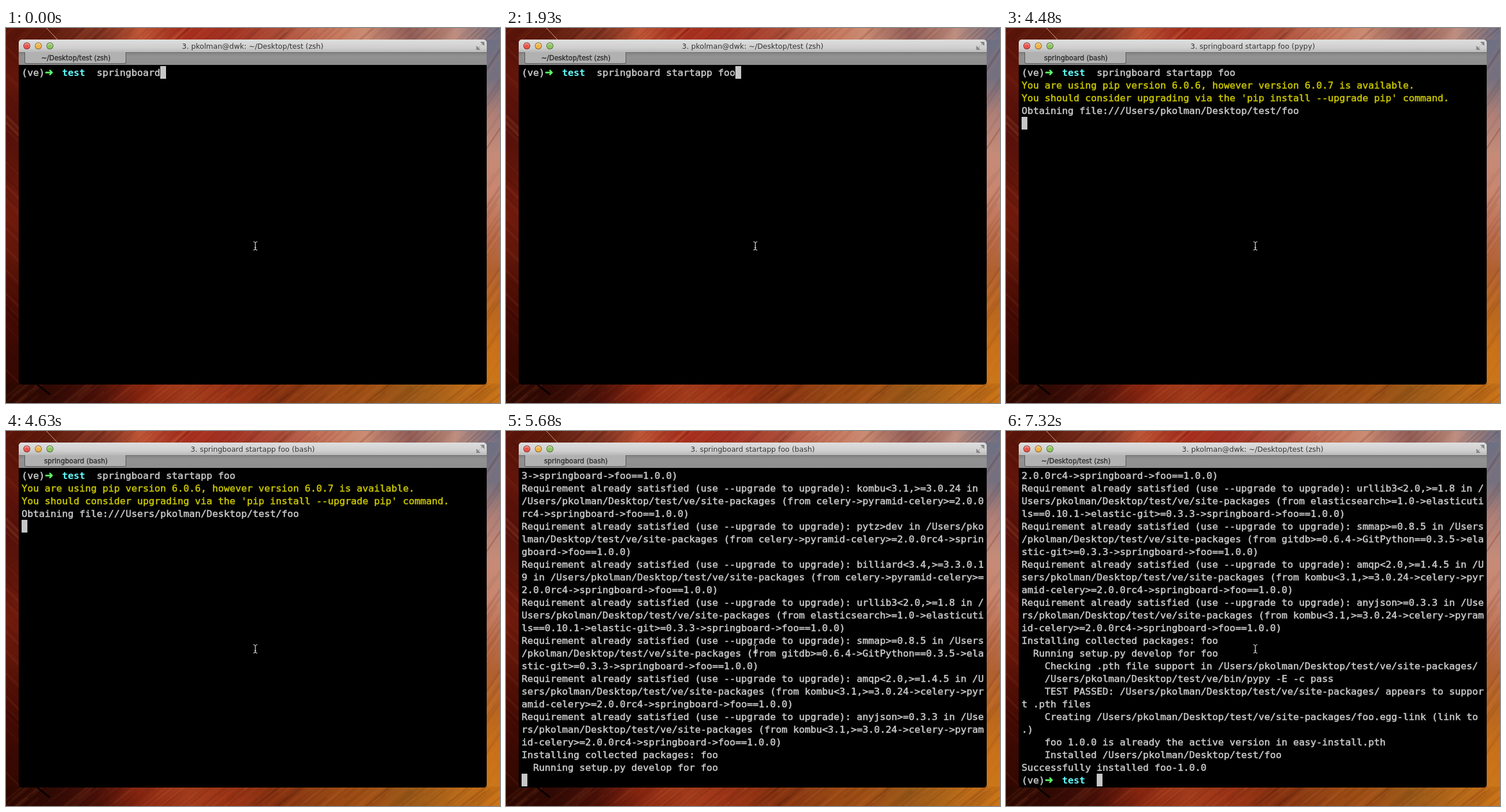
An HTML page with a canvas that plays this animation: 855x650 px, repeating every 8 s.

```html
<!DOCTYPE html>
<html lang="en">
<head>
<meta charset="utf-8">
<title>Terminal session</title>
<style>
  html, body { margin: 0; width: 100%; height: 100%; overflow: hidden; background: #5a1409; }
  #stage { position: relative; width: 855px; height: 650px; overflow: hidden; }
  #stage > * { position: absolute; }
  #wall { left: 0; top: 0; }
  #window { left: 22px; top: 20px; width: 810px; height: 598px; border-radius: 5px; background: #000; overflow: hidden; }
  #window > * { position: absolute; box-sizing: border-box; white-space: pre; text-align: center; }
  #title {
    left: 0; top: 0; width: 810px; height: 22px;
    font: 12.5px/23px "DejaVu Sans", sans-serif; color: #333;
    background: linear-gradient(#dedede, #cfcfcf 65%, #b8b8b8);
  }
  #tabs { left: 0; top: 22px; width: 810px; height: 22px; background: linear-gradient(#858585, #929292 30%, #8e8e8e); border-top: 1px solid #666; }
  #tab {
    left: 10px; top: 22px; width: 176px; height: 20px; padding-left: 2px;
    font: 11.6px/20px "DejaVu Sans", sans-serif; color: #2c2c2c; -webkit-text-stroke: .35px #2c2c2c;
    background: #b1b1b1; border: solid #555; border-width: 0 1px 1px; border-radius: 0 0 3px 3px;
  }
  .light { top: 5px; width: 12px; height: 12px; border-radius: 50%; border: 1px solid #0007; box-shadow: inset 0 2px 2px #fff7; }
  #screen {
    left: 27px; top: 67px; margin: 0; color: #c7c7c7; white-space: pre;
    font: 16.61px/22px "DejaVu Sans Mono", monospace; -webkit-text-stroke: .55px;
  }
  #screen i, #screen u { display: inline-block; height: 22px; vertical-align: top; position: relative; top: -1px; }
  #screen i { width: 10px; background: #c7c7c7; }
  #screen u { width: 30px; color: #5ffa68; font: bold 18px/22px "DejaVu Sans", sans-serif; text-decoration: none; }
  #screen b { color: #60fdff; -webkit-text-stroke: 0; }
  #screen em { color: #c7c400; font-style: normal; }
</style>
</head>
<body>
<div id="stage">
  <canvas id="wall" width="855" height="650"></canvas>
  <div id="window">
    <div id="title"></div>
    <div id="tabs"></div>
    <div id="tab"></div>
    <div class="light" style="left:8px;background:#ee5148"></div>
    <div class="light" style="left:28px;background:#f3b345"></div>
    <div class="light" style="left:48px;background:#8cc55c"></div>
    <svg style="left:791px;top:3px" width="16" height="16" fill="#888" stroke="#888">
      <path d="M8.5 1.5h6v6zM1.5 8.5v6h6zM9 7l3-3M7 9l-3 3"/>
    </svg>
  </div>
  <pre id="screen"></pre>
  <svg style="left:427px;top:369px" width="10" height="18" fill="none" stroke="#ddd" stroke-width="1.2">
    <path d="M1 1.5q3.5 0 3.5 3v8q0 3.5-3.5 3.5M8 1.5q-3.5 0-3.5 3M8 16q-3.5 0-3.5-3.5M3 11.5h3"/>
  </svg>
</div>
<script>
const LOOP = 8000, $ = id => document.getElementById(id);

// Wallpaper: a colour run along each edge, with soft diagonal brush strokes
const ctx = $('wall').getContext('2d');
let seed = 11;
const rnd = () => (seed = (seed * 16807) % 2147483647) / 2147483647;

function line(color, width, x1, y1, x2, y2) {
  ctx.strokeStyle = color;
  ctx.lineWidth = width;
  ctx.beginPath();
  ctx.moveTo(x1, y1);
  ctx.lineTo(x2, y2);
  ctx.stroke();
}

function edge(x, y, w, h, slope, count, colors) {
  const wide = w > h;
  const run = ctx.createLinearGradient(x, y, wide ? x + w : x, wide ? y : y + h);
  colors.split(' ').forEach((c, i, all) => run.addColorStop(i / (all.length - 1), '#' + c));
  ctx.save();
  ctx.beginPath();
  ctx.rect(x, y, w, h);
  ctx.clip();
  ctx.fillStyle = run;
  ctx.fillRect(x, y, w, h);
  for (let i = 0; i < count; i++) {
    const sx = x + rnd() * w, sy = y + rnd() * h, len = 12 + rnd() * 35;
    const tint = rnd() < .42 ? '230,130,80' : '45,5,0';
    const color = `rgba(${tint},${.02 + rnd() * .07})`;
    line(color, 1 + rnd() * 4, sx - len, sy - len * slope, sx + len, sy + len * slope);
  }
  ctx.restore();
}
edge(0, 0, 855, 24, -.9, 260, '5a1409 5c1a0c 783020 bd5536 a52c1c a53424 ad4c38 c17058 cb8c74 8e5c58 be8e80 707084');
edge(0, 20, 24, 600, 1, 80, '5a1409 62150a 54100a 5e1409 701a0c 601608 4a0c04 3c0903 320800');
edge(830, 20, 25, 600, -1.5, 80, '6f7084 75707e b08078 c58b78 c9866f bd7050 b0602f b9661f c87018 cc761a');
edge(0, 616, 855, 34, -.8, 260, '2c0700 300a04 481008 882610 a43c1c 9c3416 84300f 944414 a05014 985818 b46818 cb7418');
line('#d9a590', 1, 70, 0, 89, 20);
line('#080100', 3, 54, 618, 76, 635);

// Terminal text, hard wrapped at 80 columns
const user = 'pkolman', home = `/Users/${user}`;
const desk = `${home}/Desktop/test`, site = `${desk}/ve/site-packages`;
const wrap = lines => lines.flatMap(s => s.match(/.{1,80}/g));
const need = (pkg, from, dir = site) =>
  `Requirement already satisfied (use --upgrade to upgrade): ${pkg} in ${dir} (from ${from}foo==1.0.0)`;
const esc = s => s.replace(/</g, '&lt;').replace(/>/g, '&gt;');
const cursor = '<i></i>';
const prompt = '(ve)<u>➜</u><b>test</b>  ';
const show = rows => rows.map(r => esc(r) + '\n').join('');

const sb = 'springboard->', celery = 'celery->pyramid-celery>=2.0.0rc4->' + sb;
const git = 'elastic-git>=0.3.3->' + sb, kombu = 'kombu<3.1,>=3.0.24';

const command = prompt + 'springboard startapp foo\n';
const obtaining = command +
  '<em>You are using pip version 6.0.6, however version 6.0.7 is available.\n' +
  "You should consider upgrading via the 'pip install --upgrade pip' command.</em>\n" +
  `Obtaining file://${desk}/foo\n`;
const checked = wrap([
  need('springboard', '', home + '/Documents/Repositories/springboard'),
  ...['elastic-git>=0.3.3', 'unicore.content', 'unicore.google', 'unicore.distribute', 'pyramid', 'pyramid-jinja2']
    .map(pkg => need(pkg, sb))
]);
const installing = wrap([
  '3->springboard->foo==1.0.0)',
  need(kombu, celery),
  need('pytz>dev', celery),
  need('billiard<3.4,>=3.3.0.19', celery),
  need('urllib3<2.0,>=1.8', 'elasticsearch>=1.0->elasticutils==0.10.1->' + git),
  need('smmap>=0.8.5', 'gitdb>=0.6.4->GitPython==0.3.5->' + git),
  need('amqp<2.0,>=1.4.5', kombu + '->' + celery),
  need('anyjson>=0.3.3', kombu + '->' + celery),
  'Installing collected packages: foo',
  '  Running setup.py develop for foo'
]);
const finished = installing.concat(wrap([
  `    Checking .pth file support in ${site}/`,
  `    ${desk}/ve/bin/pypy -E -c pass`,
  `    TEST PASSED: ${site}/ appears to support .pth files`,
  `    Creating ${site}/foo.egg-link (link to .)`,
  '    foo 1.0.0 is already the active version in easy-install.pth',
  `    Installed ${desk}/foo`,
  'Successfully installed foo-1.0.0'
])).slice(-24);

// Each track lists [start in ms, value]
const typed = [[0, 0], [300, 1], [450, 2], [590, 3], [740, 5], [890, 6], [1340, 7], [1490, 8], [1640, 10], [1780, 11], [1930, 13]];
const shell = `3. ${user}@dwk: ~/Desktop/test `, job = '3. springboard startapp foo ';
const tracks = {
  screen: [
    ...typed.map(([t, n]) => [t, prompt + 'springboard' + ' startapp foo'.slice(0, n) + cursor]),
    [2530, command + cursor],
    [4480, obtaining + cursor],
    [5530, obtaining + show(checked) + cursor],
    [5680, show(installing) + cursor],
    [6580, show(finished) + cursor],
    [6730, show(finished) + prompt + cursor]
  ],
  title: [
    [0, shell + '(zsh)'], [2530, job + '(zsh)'], [2680, job + '(pypy)'],
    [4630, job + '(bash)'], [6730, shell + '(pypy)'], [7320, shell + '(zsh)']
  ],
  tab: [
    [0, '~/Desktop/test (zsh)'], [2530, 'springboard (pypy)'], [4480, 'springboard (bash)'],
    [6580, 'springboard (pypy)'], [6730, '~/Desktop/test (pypy)'], [7170, '~/Desktop/test (zsh)']
  ]
};

const shown = {};
function draw() {
  const now = performance.now() % LOOP;
  for (const id in tracks) {
    const html = tracks[id].filter(([t]) => t <= now).pop()[1];
    if (shown[id] !== html) $(id).innerHTML = shown[id] = html;
  }
  requestAnimationFrame(draw);
}
draw();
</script>
</body>
</html>
```
